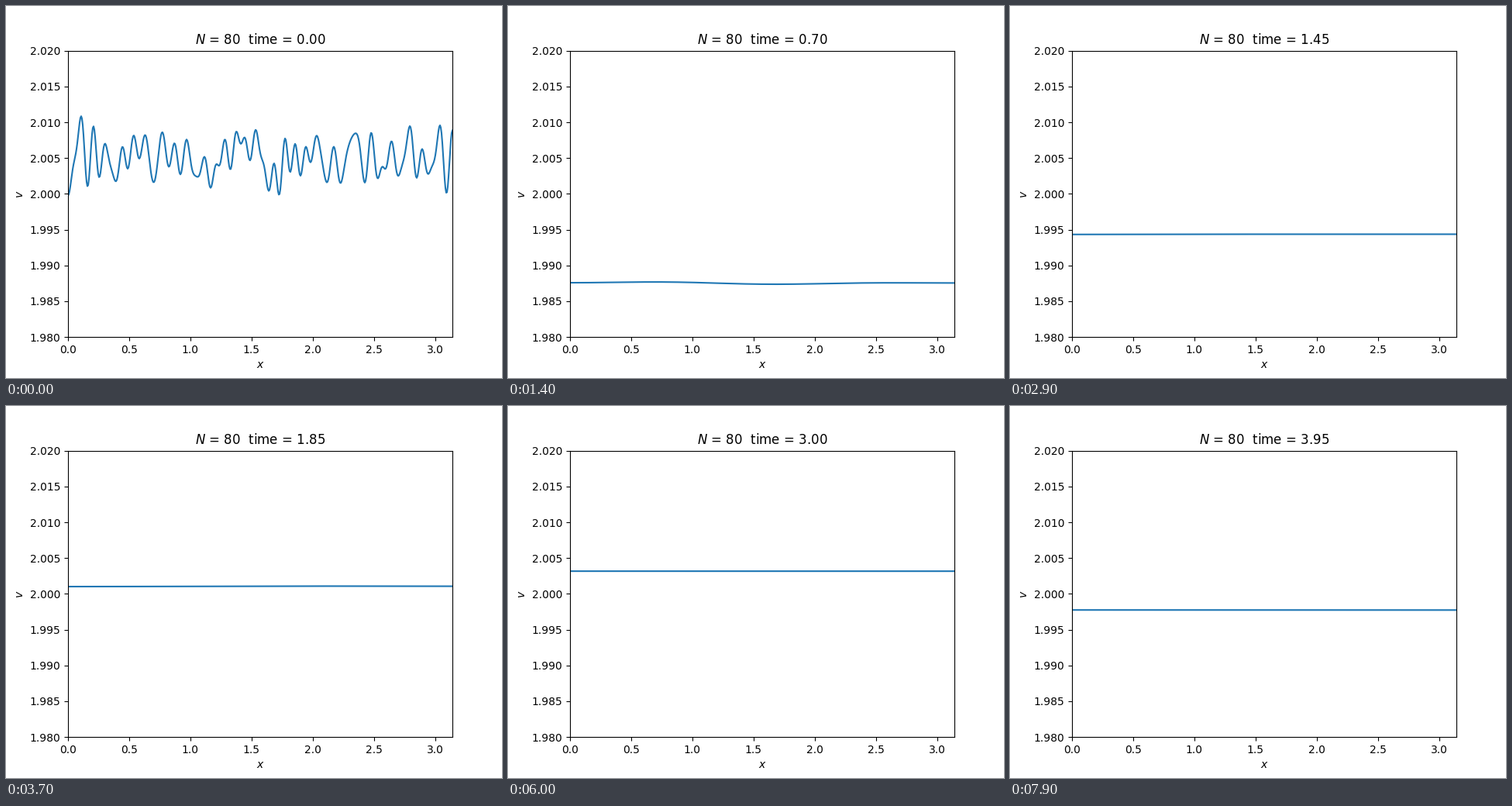
These frames come from a looping animation (640 px wide and 480 px high, 8000 ms). A matplotlib script:

```python
import numpy as np
import matplotlib.pyplot as plt
from matplotlib.animation import FuncAnimation

plt.rcParams["text.kerning_factor"] = 6     # unkerned labels

FRAMES, INTERVAL, DT = 80, 100, 0.05
N = 80                                      # cosine modes
GAMMA, OMEGA, DIFF = 0.51, 1.907, 0.2       # damping, frequency, diffusion

k = np.arange(N + 1)
rate = GAMMA + DIFF * k ** 2

# Noisy start; only the mean and the longest waves last long enough to be set
rng = np.random.default_rng(5)
cos_part = rng.normal(0, 4e-4, N + 1)
sin_part = -1.8 * cos_part
cos_part[:5] = 0.0050, 0.00007, 0.00014, 0, 0
sin_part[:5] = -0.0195, 0.00008, 0.00020, -0.00020, -0.00096

x = np.linspace(0, np.pi, 497)
basis = np.cos(np.outer(x, k))


def profile(t):
    """Each mode swings around v = 2 while it dies away."""
    swing = cos_part * np.cos(OMEGA * t) + sin_part * np.sin(OMEGA * t)
    return 2 + basis @ (np.exp(-rate * t) * swing)


fig, ax = plt.subplots(figsize=(6.4, 4.8), dpi=100)
line, = ax.plot(x, profile(0), color="#1f77b4", lw=1.5)
ax.set_xlim(0, np.pi)
ax.set_ylim(1.98, 2.02)
ax.set_xlabel("$x$")
ax.set_ylabel("$v$")
title = ax.set_title("")


def update(i):
    t = i * DT
    line.set_ydata(profile(t))
    title.set_text(f"$N$ = {N}  time = {t:.2f}")
    return line, title


anim = FuncAnimation(fig, update, frames=FRAMES, interval=INTERVAL,
                     repeat=True, repeat_delay=0, blit=False)
plt.show()
```
